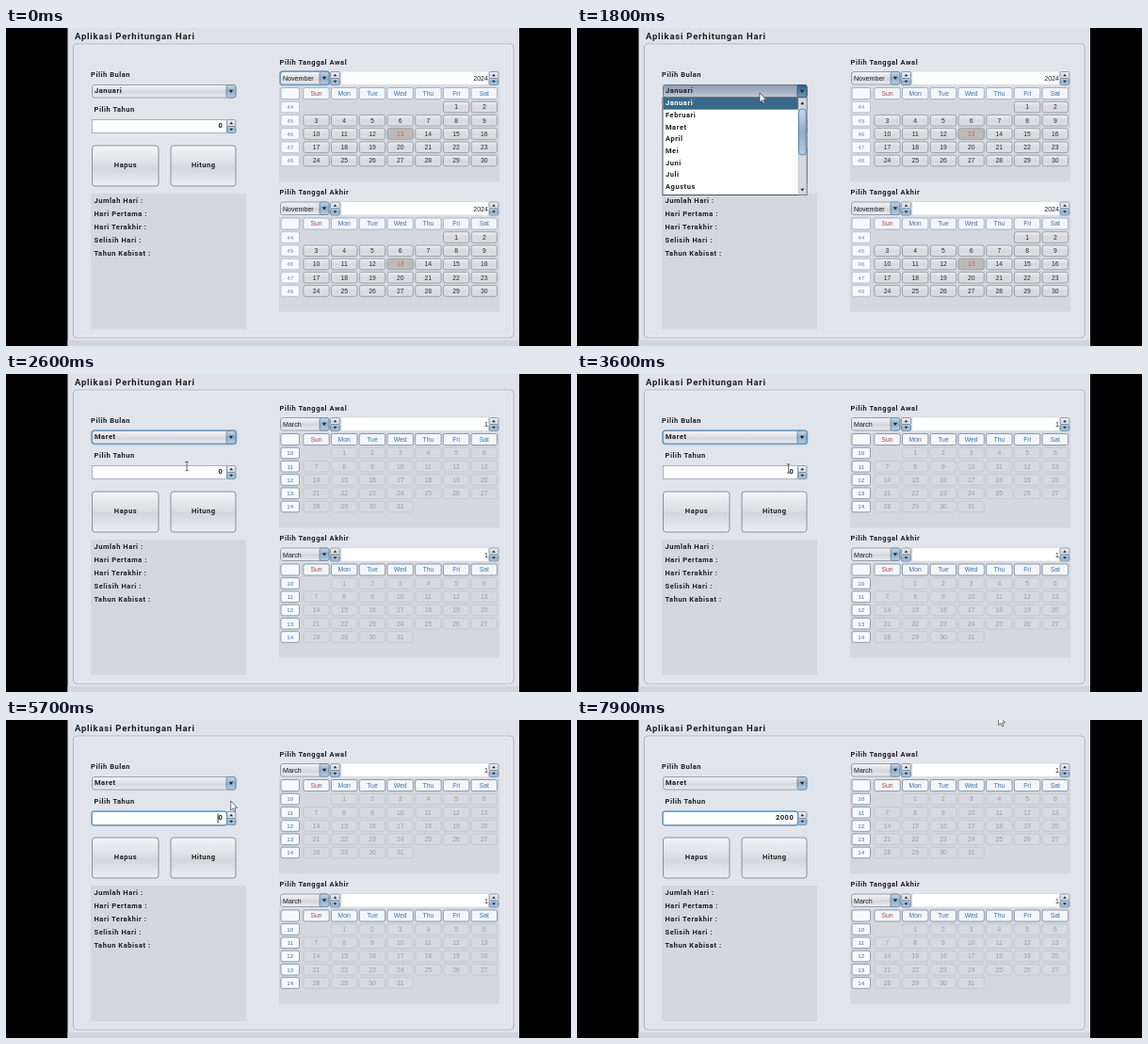
These frames come from a looping animation (600 px wide and 338 px high, 8000 ms). An HTML page:

```html
<!DOCTYPE html>
<html lang="id">
<head>
<meta charset="utf-8">
<title>Aplikasi Perhitungan Hari</title>
<style>
html, body { margin: 0; width: 100%; height: 100%; overflow: hidden; background: #000; }
svg { display: block; width: 100vw; height: 100vh; }
text { font: 6.8px "Liberation Sans", Arial, sans-serif; fill: #222; }
.b { font: 700 7.5px Roboto, sans-serif; letter-spacing: .55px; fill: #1b1d20; }
.title { font-size: 9.5px; letter-spacing: .76px; }
.mid { text-anchor: middle; }
.end { text-anchor: end; }
.week { font-size: 6.2px; }
.month { font-size: 7.1px; }
</style>
</head>
<body>
<svg id="stage" viewBox="0 0 600 338" xmlns="http://www.w3.org/2000/svg">
  <defs>
    <linearGradient id="btn" x2="0" y2="1">
      <stop offset="0" stop-color="#f3f4f6"/><stop offset=".45" stop-color="#dcdfe4"/>
      <stop offset=".55" stop-color="#d3d6dc"/><stop offset="1" stop-color="#eceef1"/>
    </linearGradient>
    <linearGradient id="cell" x2="0" y2="1">
      <stop offset="0" stop-color="#eceef0"/><stop offset=".5" stop-color="#d6d9dd"/>
      <stop offset="1" stop-color="#dddfe3"/>
    </linearGradient>
    <linearGradient id="blue" x2="0" y2="1">
      <stop offset="0" stop-color="#c6d7e8"/><stop offset=".5" stop-color="#8fadcb"/>
      <stop offset="1" stop-color="#b5cde2"/>
    </linearGradient>
    <linearGradient id="dark" x2="0" y2="1">
      <stop offset="0" stop-color="#8f9bad"/><stop offset=".5" stop-color="#a6b1c2"/>
      <stop offset="1" stop-color="#c0cad8"/>
    </linearGradient>
    <linearGradient id="deep" x2="0" y2="1">
      <stop offset="0" stop-color="#33607f"/><stop offset="1" stop-color="#6f9dbd"/>
    </linearGradient>
  </defs>
</svg>
<script>
const LOOP = 8000, STEP = 100;
const OPEN = 1700, PICK = 2600, FOCUS = 4200, TYPE = [6000, 6700, 7000];
const MONTHS = ["Januari", "Februari", "Maret", "April", "Mei", "Juni", "Juli", "Agustus"];
const DAYS = ["Sun", "Mon", "Tue", "Wed", "Thu", "Fri", "Sat"];
const ROW = 12.67, LIST_TOP = 74;
const stage = document.getElementById("stage");

function add(parent, tag, attrs, label) {
  const el = document.createElementNS(stage.namespaceURI, tag);
  for (const k in attrs) el.setAttribute(k, attrs[k]);
  if (label !== undefined) el.textContent = label;
  return parent.appendChild(el);
}
const group = parent => add(parent, "g", {});
const rect = (p, x, y, width, height, fill, stroke = "none", rx = 0, sw = .8) =>
  add(p, "rect", { x, y, width, height, fill, stroke, rx, "stroke-width": sw });
const text = (p, x, y, label, cls = "b", fill) => {
  const el = add(p, "text", { x, y, class: cls }, label);
  if (fill) el.style.fill = fill;
  return el;
};
const tri = (p, x, y, r, up) =>
  add(p, "path", { d: `M${x - r} ${y + (up ? r : -r) * .7}h${2 * r}L${x} ${y + (up ? -r : r) * .8}z`, fill: "#1c2733" });
const ring = (p, x, y, w, h) => rect(p, x, y, w, h, "none", "#6c9cc6", 3, 1.5);
const show = (el, on) => el.setAttribute("visibility", on ? "visible" : "hidden");

function spinner(p, x, y, w, h) {
  rect(p, x, y, w, h / 2, "url(#btn)", "#7f8b99", 1.5);
  rect(p, x, y + h / 2, w, h / 2, "url(#blue)", "#66809b", 1.5);
  tri(p, x + w / 2, y + h * .26, 1.7, true);
  tri(p, x + w / 2, y + h * .74, 1.7);
}

function combo(p, x, y, w, h) {
  rect(p, x, y, w, h, "url(#btn)", "#858b95", 2.5);
  rect(p, x + w - 10, y, 10, h, "url(#blue)", "#66809b", 2);
  tri(p, x + w - 5, y + h / 2, 2.2);
}

function calendar(p, dy, month, year, firstWeek, firstDay, count, off) {
  const g = add(p, "g", { transform: `translate(0 ${dy})` });
  combo(g, 291.5, 46.5, 51.5, 13.5);
  text(g, 294, 56.3, month, "month");
  spinner(g, 344.5, 46.5, 10, 14);
  rect(g, 356, 46, 157, 14.5, "#fff", "#c3c7ce", 0, .5);
  text(g, 512, 56.3, year, "month end");
  spinner(g, 513, 46.5, 10, 14);
  const edge = off ? "#75899e" : "#97abc2";
  rect(g, 292, 63.5, 19.5, 12, "#f7f9fb", edge, 2);
  const colX = c => 315.8 + c * 29.72;
  const rowY = r => 78.2 + r * 14.25;
  DAYS.forEach((d, c) => {
    rect(g, colX(c), 63.5, 27.4, 12, "#f3f6f9", edge, 2);
    text(g, colX(c) + 13.7, 71.9, d, "mid", c ? "#3871ac" : "#a04a48");
  });
  for (let r = 0; r < 5; r++) {
    rect(g, 292, rowY(r), 19.5, 11.6, "#f7f9fb", off ? "#75899e" : "#b0bdcb", 2);
    text(g, 301.8, rowY(r) + 8.1, firstWeek + r, "mid week", off ? "#3f6c98" : "#6f8aa5");
  }
  for (let d = 1; d <= count; d++) {
    const i = d - 1 + firstDay, x = colX(i % 7), y = rowY(Math.floor(i / 7));
    const today = !off && d === 13;
    rect(g, x, y, 27.4, 11.6, off ? "#d6d9de" : today ? "#bdbbba" : "url(#cell)", off ? "#bfc3c9" : "#8f949b", 2.5);
    text(g, x + 13.7, y + 8.2, d, "mid", off ? "#989da4" : today ? "#b56a55" : "#2b2d30");
  }
}

// Window
rect(stage, 0, 0, 600, 338, "#000");
rect(stage, 65.5, 0, 479.5, 338, "#dfe2e9");
rect(stage, 65.5, 332, 479.5, 6, "#d2d5dc");
rect(stage, 71.5, 17, 467.5, 312, "#e1e4eb", "#b0b5bf", 4, 1.2);
rect(stage, 72.7, 18.2, 465.1, 309.6, "none", "#eef0f4", 3, .9);
text(stage, 73, 12, "Aplikasi Perhitungan Hari", "b title");
text(stage, 90, 52.4, "Pilih Bulan");
text(stage, 93.5, 89.4, "Pilih Tahun");
text(stage, 290.5, 38.5, "Pilih Tanggal Awal");
text(stage, 290.5, 177.3, "Pilih Tanggal Akhir");
rect(stage, 90, 176, 165, 144, "#d4d7dd");
["Jumlah Hari :", "Hari Pertama :", "Hari Terakhir :", "Selisih Hari :", "Tahun Kabisat :"]
  .forEach((s, i) => text(stage, 93.5, 186.3 + i * 13.8, s));
[[91.5, 70.5, "Hapus"], [175, 69, "Hitung"]].forEach(([x, w, s]) => {
  rect(stage, x, 125, w, 43, "url(#btn)", "#8b9099", 3, 1);
  text(stage, x + w / 2 + .3, 147.8, s, "b mid");
});

// Calendars
rect(stage, 290, 62, 234, 101.5, "#d4d7dd");
rect(stage, 290, 200.5, 234, 101, "#d4d7dd");
const before = group(stage), after = group(stage);
for (const dy of [0, 138.5]) {
  calendar(before, dy, "November", "2024", 44, 5, 30, false);
  calendar(after, dy, "March", "1", 10, 1, 31, true);
}
const calRing = ring(before, 291, 46, 52.5, 14.5);

// Month combo
combo(stage, 91.5, 60.5, 152.5, 13.5);
const pressed = group(stage);
rect(pressed, 91.5, 60.5, 152.5, 13.5, "url(#dark)", "#5c6c80", 2.5);
rect(pressed, 234, 60.5, 10, 13.5, "url(#deep)", "#2f5570", 2);
tri(pressed, 239, 67.3, 2.2);
const chosen = text(stage, 94, 69.2, "");
const comboRing = ring(stage, 91, 60, 153.5, 14.5);

// Year field
rect(stage, 91.5, 97.5, 143, 14, "#fff", "#9ca1aa", 0, .8);
spinner(stage, 234.5, 97.5, 9.5, 14);
const yearRing = ring(stage, 91, 97, 143.5, 15);
const year = text(stage, 230.3, 106.4, "0", "b end");
const caret = rect(stage, 224.6, 99.5, .9, 10, "#111");

// Drop-down list
const popup = group(stage);
rect(popup, 91, 74, 153, 103.5, "#fff", "#3c4249", 0, .9);
const mark = rect(popup, 91.5, LIST_TOP, 143.5, ROW, "#39698a");
const items = MONTHS.map((m, i) => text(popup, 94, 82.3 + i * ROW, m));
rect(popup, 235, 74.5, 8.6, 102.6, "#d5d9df", "#a8aeb7", 0, .5);
rect(popup, 235.4, 86, 7.8, 49, "url(#blue)", "#4f7396", 3.5);
tri(popup, 239.3, 79.8, 1.9, true);
tri(popup, 239.3, 172, 1.9);

// Pointers
const arrow = add(stage, "path", { d: "M0 0V10L2.3 7.9L3.8 11.3L5.3 10.6L3.9 7.3H7z", fill: "#fff", stroke: "#33363a", "stroke-width": .7 });
const beam = add(stage, "path", { d: "M-1.8 -4.6H1.8M0 -4.6V4.6M-1.8 4.6H1.8", fill: "none", stroke: "#44474b", "stroke-width": .8 });

// Pointer stops: time, x, y
const PATH = [
  [900, 444, 120], [1200, 300, 82], [1500, 196, 65], [1600, 194.5, 64.5], [1800, 194, 69],
  [2100, 191, 84], [2400, 190, 100], [2500, 190, 100.5], [2600, 192, 98], [2700, 190, 100],
  [3000, 137, 132], [3200, 158, 124], [3500, 225.5, 101], [3600, 224.5, 100.5], [4400, 224.5, 100.5],
  [4800, 238.7, 86], [7700, 238.7, 86], [7900, 447.7, -4.5]
];

function pointer(t) {
  const i = PATH.findIndex(p => p[0] > t);
  if (i === 0) return null;
  if (i < 0) return PATH[PATH.length - 1].slice(1);
  const [t0, x0, y0] = PATH[i - 1], [t1, x1, y1] = PATH[i];
  const k = (t - t0) / (t1 - t0);
  return [x0 + (x1 - x0) * k, y0 + (y1 - y0) * k];
}

function caretOn(t) {
  if (t < FOCUS) return false;
  if (t < TYPE[0]) return t < 4300 || Math.floor((t - 4300) / 500) % 2 === 0;
  const last = TYPE.filter(k => k <= t).pop();
  return Math.floor((t - last) / 500) % 2 === 0;
}

function draw(now) {
  const t = Math.floor(now % LOOP / STEP) * STEP;
  const open = t >= OPEN && t < PICK, picked = t >= PICK;
  const pos = pointer(t);
  show(before, !picked);
  show(after, picked);
  show(calRing, t < OPEN);
  show(pressed, open);
  show(popup, open);
  show(comboRing, picked && t < FOCUS);
  show(yearRing, t >= FOCUS);
  show(caret, caretOn(t));
  chosen.textContent = picked ? "Maret" : "Januari";
  year.textContent = "2000".slice(0, TYPE.filter(k => k <= t).length + 1).replace(/^2$/, "0");

  const over = pos ? Math.max(0, Math.floor((pos[1] - LIST_TOP) / ROW)) : 0;
  mark.setAttribute("y", LIST_TOP + over * ROW);
  items.forEach((el, i) => el.style.fill = i === over ? "#fff" : "#1b1d20");

  const inField = pos && pos[0] > 91 && pos[0] < 234 && pos[1] > 96 && pos[1] < 112;
  show(arrow, pos && !inField);
  show(beam, inField);
  if (pos) (inField ? beam : arrow).setAttribute("transform", `translate(${pos[0]} ${pos[1]})`);
}

const start = performance.now();
function tick() {
  draw(performance.now() - start);
  requestAnimationFrame(tick);
}
tick();
</script>
</body>
</html>
```
